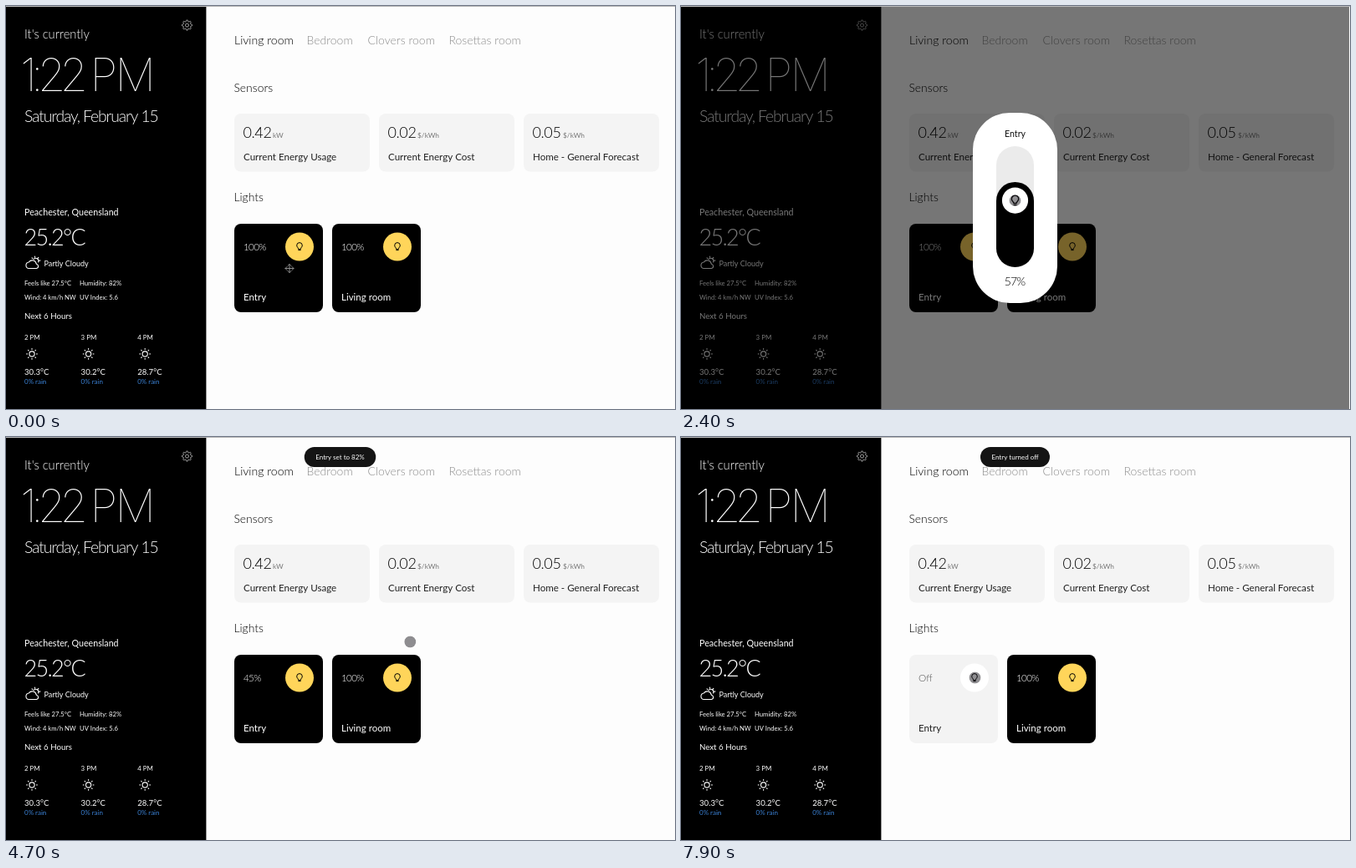
An HTML page with a canvas that plays this animation: 800 by 483 pixels, repeating every 8 s.

```html
<!DOCTYPE html>
<html lang="en">
<head>
<meta charset="utf-8">
<title>Home dashboard</title>
<style>
  html, body { margin: 0; width: 100%; height: 100%; overflow: hidden; background: #fdfdfd; }
  canvas { display: block; width: 100vw; height: 100vh; }
</style>
</head>
<body>
<canvas id="stage" width="800" height="483"></canvas>
<script>
const ctx = document.getElementById('stage').getContext('2d');
const LOOP = 8000, STEP = 100;
const TAP = 'rgba(40,168,230,.4)';
const YELLOW = '#ffd55a';

const BULB = new Path2D('M-1.4 3c0-1.6-1.9-2-1.9-4.1a3.3 3.3 0 0 1 6.6 0c0 2.1-1.9 2.5-1.9 4.1zM-1.2 4.6h2.4');
const CLOUD = new Path2D('M27 314.5a3.8 3.8 0 0 1 .3-7.5a5 5 0 0 1 9 2.2a2.7 2.7 0 0 1 .2 5.3z' +
  'M33 303.6a3.3 3.3 0 0 1 5.6 3.4M34.5 300v1.2M38.8 301.4l-.8 1M41 305l-1.2.3M31 301.8l.9.9');
const MOVE = new Path2D('M-5 0h10M0-5v10M-2-3l2-2 2 2M-2 3l2 2 2-2M-3-2l-2 2 2 2M3-2l2 2-2 2');

// Piecewise linear value from [time, value] pairs.
function key(t, ...points) {
  let [t0, v0] = points[0];
  for (const [t1, v1] of points) {
    if (t < t1) return t <= t0 ? v0 : v0 + (v1 - v0) * (t - t0) / (t1 - t0);
    [t0, v0] = [t1, v1];
  }
  return v0;
}

function text(s, x, y, size, color, { weight = 400, gap = 0, align = 'left', font = 'Lato' } = {}) {
  ctx.font = `${weight} ${size}px ${font}, sans-serif`;
  ctx.letterSpacing = gap + 'px';
  ctx.textAlign = align;
  ctx.fillStyle = color;
  ctx.fillText(s, x, y);
}

function box(x, y, w, h, r, color) {
  ctx.fillStyle = color;
  ctx.beginPath();
  ctx.roundRect(x, y, w, h, r);
  ctx.fill();
}

function disc(x, y, r, color) {
  ctx.fillStyle = color;
  ctx.beginPath();
  ctx.arc(x, y, r, 0, Math.PI * 2);
  ctx.fill();
}

function ring(x, y, r, color, width, from = 0, to = Math.PI * 2) {
  ctx.strokeStyle = color;
  ctx.lineWidth = width;
  ctx.beginPath();
  ctx.arc(x, y, r, from, to);
  ctx.stroke();
}

function icon(path, x, y, scale, color, width) {
  ctx.save();
  ctx.translate(x, y);
  ctx.scale(scale, scale);
  ctx.strokeStyle = color;
  ctx.lineWidth = width;
  ctx.lineCap = ctx.lineJoin = 'round';
  ctx.stroke(path);
  ctx.restore();
}

function gear(x, y) {
  ctx.strokeStyle = '#b5b5b5';
  ctx.lineWidth = 0.9;
  ctx.beginPath();
  for (let i = 0; i < 64; i++) {
    const a = i * Math.PI / 32;
    const r = 5.3 + 0.8 * Math.max(-1, Math.min(1, 2 * Math.cos(8 * a)));
    ctx.lineTo(x + r * Math.cos(a), y + r * Math.sin(a));
  }
  ctx.closePath();
  ctx.stroke();
  ring(x, y, 2, '#b5b5b5', 0.9);
}

function sun(x, y) {
  ring(x, y, 3.1, '#fff', 1.1);
  ctx.beginPath();
  for (let i = 0; i < 8; i++) {
    const c = Math.cos(i * Math.PI / 4), s = Math.sin(i * Math.PI / 4);
    ctx.moveTo(x + 5 * c, y + 5 * s);
    ctx.lineTo(x + 6.8 * c, y + 6.8 * s);
  }
  ctx.stroke();
}

function sidebar() {
  box(0, 0, 239.4, 483, 0, '#000');
  text("It's currently", 22, 39, 14.7, '#fff', { weight: 300 });
  gear(216.5, 23);

  const clock = { weight: 100, font: 'Inter' };
  [['1', 17], [':', 30], ['2', 38], ['2', 64.5], ['P', 100.5], ['M', 130.5]]
    .forEach(([s, x]) => text(s, x, 102, 54, '#fff', clock));
  text('Saturday, February 15', 22, 138.5, 19.3, '#fff', { weight: 300, gap: -1.1 });

  text('Peachester, Queensland', 22, 250.5, 10.7, '#fff');
  text('25.2°C', 21.5, 286.5, 27, '#fff', { weight: 300, gap: -1.7 });
  icon(CLOUD, 0, 0, 1, '#fff', 1.1);
  text('Partly Cloudy', 45.5, 312, 9, '#fff');
  text('Feels like 27.5°C', 22, 334.5, 7.7, '#fff');
  text('Humidity: 82%', 88, 334.5, 7.7, '#fff');
  text('Wind: 4 km/h NW', 22, 351.5, 7.6, '#fff');
  text('UV Index: 5.6', 88, 351.5, 7.7, '#fff');
  text('Next 6 Hours', 22, 375, 9.7, '#fff');

  ['30.3°C', '30.2°C', '28.7°C'].forEach((temp, i) => {
    const x = 22 + 67.6 * i;
    text(`${i + 2} PM`, x, 400, 7.9, '#fff');
    sun(x + 9, 417);
    text(temp, x, 441.5, 9.6, '#fff');
    text('0% rain', x, 453, 8, '#3b82d6');
  });
}

function rooms() {
  box(239, 0, 561, 483, 0, '#fdfdfd');
  const light = { weight: 300 };
  text('Living room', 273, 46, 14.1, '#000', light);
  [['Bedroom', 359.5], ['Clovers room', 432.5], ['Rosettas room', 529.5]]
    .forEach(([s, x]) => text(s, x, 46, 14, '#8c8c8c', light));

  text('Sensors', 272.5, 102.5, 13.9, '#000', light);
  [['0.42', 'kW', 'Current Energy Usage', 319],
   ['0.02', '$/kWh', 'Current Energy Cost', 492],
   ['0.05', '$/kWh', 'Home - General Forecast', 666]].forEach(([value, unit, name, unitX], i) => {
    const x = 273 + 173 * i;
    box(x, 129, 162, 69.5, 8, '#f4f4f4');
    text(value, x + 10.5, 157.5, 18, '#000', { weight: 300, gap: -0.4 });
    text(unit, unitX, 157.5, 8.4, '#777');
    text(name, x + 11, 184.5, 11.6, '#222');
  });
  text('Lights', 272.5, 234, 13.9, '#000', light);
}

function tileContent(x, level, name, on) {
  text(level, x + 11, 292.5, 11.7, on ? '#fff' : '#555', { weight: 300, gap: on ? -0.7 : 0 });
  disc(x + 78, 288.5, 17, on ? YELLOW : '#fff');
  icon(BULB, x + 78, 288, 1, '#000', 1);
  text(name, x + 11, 352.5, 11.5, on ? '#fff' : '#222');
}

function tile(x, level, name, { on = true, busy = false } = {}) {
  box(x, 261, 106, 106, 8, on ? '#000' : '#f3f3f3');
  ctx.save();
  if (busy) {
    ctx.globalAlpha = 0.17;
    ctx.filter = 'blur(1.5px)';
  }
  tileContent(x, level, name, on);
  ctx.restore();
}

function spinner(x, y, t) {
  const a = (t - 6000) / 1000 * Math.PI * 2 + 0.96;
  ring(x, y, 9.3, '#555', 1.6);
  ring(x, y, 9.3, '#fff', 1.8, a - 0.78, a + 0.78);
}

function dialog(level) {
  box(349, 128, 101, 228, 44, '#fff');
  text('Entry', 399.5, 156.5, 10.6, '#111', { align: 'center' });

  const h = 44.5 + level * 1.005, top = 313 - h;
  box(377, 168, 45, 145, 22.5, '#ebebeb');
  box(377, top, 45, h, 22.5, '#000');
  disc(399.5, top + 22.2, 15.6, '#fff');
  icon(BULB, 399.5, top + 21.7, 1.25, '#000', 1);
  text(Math.round(level) + '%', 399, 334.5, 14, '#000', { weight: 300, gap: -0.9, align: 'center' });
}

function toast(message, width, dy, alpha) {
  ctx.save();
  ctx.globalAlpha = alpha;
  box(399.5 - width / 2, 12 + dy, width, 24, 12, '#141414');
  text(message, 399.5, 26.5 + dy, 8, '#fff', { align: 'center' });
  ctx.restore();
}

function toasts(t) {
  if (t >= 3400 && t < 6600) {
    const dy = key(t, [3400, -6], [3500, -2], [3600, 0], [6300, 0], [6500, -10]);
    const alpha = key(t, [3400, 0.6], [3600, 1], [6300, 1], [6500, 0.2]);
    toast('Entry set to 82%', 85.5, dy, alpha);
  } else if (t >= 6700) {
    toast('Entry turned off', 83, key(t, [6700, -6], [6800, -2], [6900, 0]), key(t, [6700, 0.6], [6900, 1]));
  }
}

function pointer(t) {
  const x = key(t, [100, 339], [300, 331.5], [1100, 331.5], [1500, 399.5], [4100, 399.5],
    [4400, 483.3], [4900, 483.3], [5500, 360], [6000, 360], [6500, 351.5]);
  const y = key(t, [100, 314.5], [300, 324], [1100, 324], [1500, 190.3], [1600, 190.3], [1800, 201],
    [2000, 208.5], [2600, 245.5], [4900, 245.5], [5500, 288.5]);
  if (t < 100) {
    icon(MOVE, x, y, 1, '#999', 0.9);
    return;
  }
  disc(x, y, 7, 'rgba(10,8,16,.46)');
  ring(x, y, 7.5, 'rgba(255,255,255,.65)', 1.2);
}

function draw(t) {
  const shade = key(t, [400, 0], [500, 0.6], [600, 1], [4600, 1], [4700, 0]);
  const tapped = t < 500 ? 0 : key(t, [700, 1], [900, 0]);
  const busy = t >= 5800 && t < 6600;
  const off = t >= 6600;
  const level = key(t, [1600, 100], [1800, 90], [2000, 82], [2600, 45]);

  rooms();
  sidebar();
  tile(273, off ? 'Off' : t < 3300 ? '100%' : '45%', 'Entry', { on: !off, busy });
  tile(390, '100%', 'Living room');
  if (busy) spinner(326, 313.5, t);

  if (shade) {
    box(0, 0, 799, 483, 0, `rgba(0,0,0,${0.535 * shade})`);
    ctx.globalAlpha = shade;
    dialog(level);
    ctx.globalAlpha = tapped;
    box(273, 261, 106, 106, 0, TAP);
    ctx.globalAlpha = 1;
    if (t >= 1600 && t < 2000) box(377, 168, 45, 145, 0, TAP);
  }
  box(0, 0, 800, 1, 0, '#bbb');
  toasts(t);
  pointer(t);
}

let last = -1;
const start = performance.now();
function tick() {
  const t = Math.floor((performance.now() - start) % LOOP / STEP) * STEP;
  if (t !== last) draw(last = t);
  requestAnimationFrame(tick);
}
tick();
</script>
</body>
</html>
```
